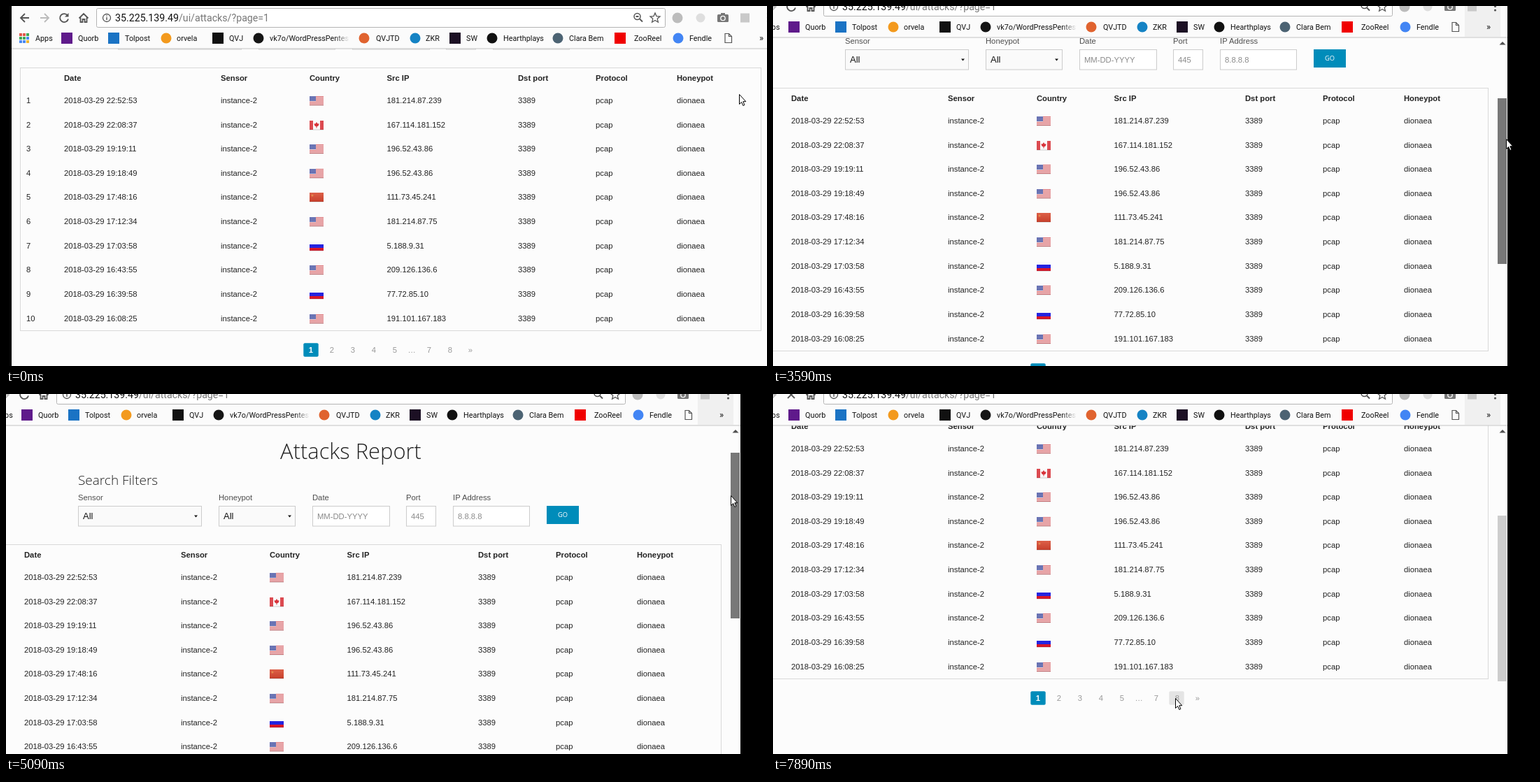
An HTML page for the animation above (8 s loop, 1088 by 515 pixels).

```html
<!DOCTYPE html>
<html lang="en">
<head>
<meta charset="utf-8">
<title>Attacks report</title>
<style>
  html, body { margin: 0; width: 100%; height: 100%; overflow: hidden; background: #000; }
  svg { display: block; }
  text { white-space: pre; }
  .page text { font: 11.25px "Liberation Sans", Arial, sans-serif; fill: #222; }
  .page .bold { font-weight: bold; }
  .page .label { fill: #4d4d4d; }
  .page .hint { fill: #8a8a8a; }
  .page .option { font-size: 13px; fill: #111; }
  .page .light { font-family: "Open Sans", sans-serif; font-weight: 300; }
  .page .go { font: 9.3px "Open Sans", sans-serif; fill: #fff; }
  .page .pager { fill: #999; }
  .page .current { fill: #fff; font-weight: bold; }
  .mid { text-anchor: middle; }
  .chrome text { font: 10.8px Roboto, sans-serif; fill: #111; }
  .chrome .url { font-size: 14.2px; }
  .icon { fill: none; stroke: #555; stroke-width: 1.8; }
</style>
</head>
<body>
<svg id="stage" width="1088" height="515" viewBox="0 0 1088 515"></svg>
<script>
const LOOP = 8000;
const PAPER = '#fcfcfc', BAR = '#fbfbfb', BLUE = '#008cba';

const rect = (x, y, w, h, fill, extra = '') =>
  `<rect x="${x}" y="${y}" width="${w}" height="${h}" fill="${fill}" ${extra}/>`;
const circle = (x, y, r, fill, extra = '') =>
  `<circle cx="${x}" cy="${y}" r="${r}" fill="${fill}" ${extra}/>`;
const path = (d, extra = 'class="icon"') => `<path d="${d}" ${extra}/>`;
const text = (x, y, content, cls = '', extra = '') =>
  `<text x="${x}" y="${y}" class="${cls}" ${extra}>${content}</text>`;
const range = n => [...Array(n).keys()];

// ---- page ----
const flags = {
  us: range(7).map(i => rect(0, i * 2, 20, 1, '#d8646a')).join('') + rect(0, 0, 9, 7, '#6a74b4'),
  ca: rect(0, 0, 5, 13, '#dc4a50') + rect(15, 0, 5, 13, '#dc4a50') +
      path('M10 2l1.4 2.2 2.3.2-1.2 3.200-2 1v2h-1v-2l-2-1-1.200-3.200 2.300-.2z', 'fill="#d8333a"'),
  cn: rect(0, 0, 20, 13, 'url(#silk)') + circle(4, 4, 1.5, '#e58a4a'),
  ru: rect(0, 4, 20, 5, '#2424e0') + rect(0, 9, 20, 4, '#d8182a'),
};
const flag = (code, x, y) =>
  `<g transform="translate(${x} ${y})">${rect(0, 0, 20, 13, code === 'us' ? '#f6e4e4' : '#fafafa')}${flags[code]}` +
  rect(0, 12.5, 20, 1, '#000', 'opacity=".18"') + '</g>';

const attacks = [
  ['22:52:53', 'us', '181.214.87.239'], ['22:08:37', 'ca', '167.114.181.152'],
  ['19:19:11', 'us', '196.52.43.86'], ['19:18:49', 'us', '196.52.43.86'],
  ['17:48:16', 'cn', '111.73.45.241'], ['17:12:34', 'us', '181.214.87.75'],
  ['17:03:58', 'ru', '5.188.9.31'], ['16:43:55', 'us', '209.126.136.6'],
  ['16:39:58', 'ru', '77.72.85.10'], ['16:08:25', 'us', '191.101.167.183'],
];
const columns = { Date: 83, Sensor: 307, Country: 434, 'Src IP': 544.5, 'Dst port': 732, Protocol: 843, Honeypot: 959 };

function attackRow([time, country, ip], i) {
  const y = Math.round(139 + i * 34.62);
  const cells = { Date: '2018-03-29 ' + time, Sensor: 'instance-2', 'Src IP': ip,
                  'Dst port': 3389, Protocol: 'pcap', Honeypot: 'dionaea' };
  return text(29, y, i + 1) + flag(country, columns.Country, y - 10) +
    Object.entries(cells).map(([name, value]) => text(columns[name], y, value)).join('');
}

const field = (x, w, label, value, select) =>
  text(x, 25, label, 'label') +
  rect(x + 0.5, 33.5, w - 1, 28.5, select ? '#fafafa' : '#fff', 'stroke="#ccc"') +
  text(x + 7, select ? 51.5 : 52, value, select ? 'option' : 'hint') +
  (select ? path(`M${x + w - 11} 46.5h5l-2.5 3z`, 'fill="#111"') : '');

const pager = [['2', 466], ['3', 496], ['4', 526], ['5', 556], ['…', 580], ['7', 605], ['8', 635], ['»', 664]];
const pageButton = (x, fill, extra = '') => rect(x + 0.3, 482.3, 21.4, 19.4, fill, 'rx="2" ' + extra);

const page =
  text(550, -34, 'Attacks Report', 'light mid', 'style="font-size:30.9px"') +
  text(160, 3, 'Search Filters', 'light', 'style="font-size:19px"') +
  field(160, 177, 'Sensor', 'All', true) + field(361, 110, 'Honeypot', 'All', true) +
  field(495, 111, 'Date', 'MM-DD-YYYY') + field(629, 43, 'Port', '445') + field(696, 110, 'IP Address', '8.8.8.8') +
  rect(830, 33, 46, 26, BLUE) + text(853, 49, 'GO', 'go mid') +
  rect(20.5, 88.5, 1059, 376, 'none', 'stroke="#d9d9d9"') +
  Object.entries(columns).map(([name, x]) => text(x, 107, name, 'bold')).join('') +
  attacks.map(attackRow).join('') +
  pageButton(425, BLUE) + text(436, 496, '1', 'current mid') +
  pageButton(623, '#e4e4e4', 'id="hover"') +
  pager.map(([label, x]) => text(x, 496, label, 'pager mid')).join('');

// ---- browser frame ----
const bookmarks = [
  ['square', '#5f1a8b', 87, 'Quorb', 103], ['square', '#1a73c4', 154, 'Tolpost', 170],
  ['circle', '#f39a1e', 229, 'orvela', 244], ['square', '#111', 303, 'QVJ', 319],
  ['circle', '#151515', 361, 'vk7o/WordPressPentest', 377], ['circle', '#e0632f', 512, 'QVJTD', 529],
  ['circle', '#1583c4', 585, 'ZKR', 600], ['square', '#1c1024', 642, 'SW', 658],
  ['circle', '#111', 695, 'Hearthplays', 711], ['circle', '#4c6373', 789, 'Clara Bem', 805],
  ['square', '#f00000', 878, 'ZooReel', 898], ['circle', '#4285f4', 961, 'Fendle', 977],
];
const bookmark = ([shape, color, x, label, textX]) =>
  (shape === 'circle' ? circle(x, 46, 7.5, color) : rect(x - 8, 38, 16, 16, color)) + text(textX, 50, label);

const appColors = ['#e2574c', '#3fa757', '#4a8af4', '#f2b632'];
const chrome =
  rect(8, -20, 1099, 81, BAR) + rect(8, 60.5, 1099, 1, '#c4c4c4') +
  rect(1046, 8, 51, 52, '#f0f0f0', 'id="overflow"') +
  path('M33 17H21.500M27 11l-6 6 6 6') +
  path('M49 17h11.500M55 11l6 6-6 6', 'class="icon" style="stroke:#bbb"') +
  `<g id="reload">${path('M88 13.500a6 6 0 1 0 1 5')}${path('M89.500 10v5.500h-5.500z', 'fill="#555"')}</g>` +
  path('M78 12l10 10M88 12l-10 10', 'class="icon" id="stop"') +
  path('M104.500 17.500l6.500-6.500 6.500 6.500M106.500 16.500v6.500h3v-4h3v4h3v-6.500') +
  rect(129.5, 3.5, 813, 27, '#fff', 'rx="2" stroke="#b4b4b4"') +
  circle(144, 17, 5.5, 'none', 'stroke="#555" stroke-width="1.3"') +
  path('M144 16v4M144 13.500v1.300', 'stroke="#555" stroke-width="1.4"') +
  text(156, 21.5, '35.225.139.49<tspan fill="#777">/ui/attacks/?page=1</tspan>', 'url') +
  circle(902.5, 15, 4.5, 'none', 'stroke="#555" stroke-width="1.5"') + path('M906 18.500l4 4M900.500 15h4') +
  path('M928 10l2 4.600 5 .4-3.800 3.300 1.200 4.900-4.400-2.700-4.400 2.700 1.200-4.900L921 15l5-.4z',
       'fill="none" stroke="#555" stroke-width="1.3"') +
  circle(960, 17, 7.5, '#bcbcbc') + circle(993, 17, 6.5, '#dedede') +
  rect(1017, 12, 16, 11, '#777', 'rx="1.5"') + rect(1022, 10, 6, 3, '#777') +
  circle(1025, 17.5, 3.2, '#777', 'stroke="#fff" stroke-width="1.3"') +
  rect(1050, 10.5, 13, 13, '#c9c9c9') +
  [11, 16.5, 22].map(y => circle(1089.5, y, 1.6, '#555')).join('') +
  range(9).map(i => rect(19 + i % 3 * 5, 39 + Math.floor(i / 3) * 5, 4, 4, appColors[Math.floor(i / 3) + (i % 3 > 1)])).join('') +
  text(42, 50, 'Apps') + bookmarks.map(bookmark).join('') +
  rect(470, 38, 28, 16, 'url(#fade)') +
  path('M1028 39.500h5.500l4 4v9h-9.500zM1033.500 39.500v4h4', 'class="icon" style="stroke-width:1.2"') +
  text(1080, 49.5, '»', 'mid', 'style="font-size:13px"');

const stage = document.getElementById('stage');
stage.innerHTML = `
  <defs>
    <clipPath id="view">${rect(8, 61, 1085, 600, '#000')}</clipPath>
    <linearGradient id="fade"><stop stop-color="${BAR}" stop-opacity="0"/><stop offset=".75" stop-color="${BAR}"/></linearGradient>
    <linearGradient id="silk" x2="0" y2="1"><stop stop-color="#dc6048"/><stop offset="1" stop-color="#c8402c"/></linearGradient>
  </defs>
  ${rect(0, 0, 1088, 515, '#000')}
  <g id="window">
    ${rect(8, -20, 1099, 640, PAPER)}
    <g clip-path="url(#view)"><g id="page" class="page">${page}</g></g>
    ${path('M1095.500 71.500h9l-4.500-4.500z', 'fill="#505050"')}
    ${rect(1093, 170, 13, 237, '#cdcdcd', 'id="thumb"')}
    <g class="chrome">${chrome}</g>
  </g>
  <path id="cursor" d="M.5 .5V14.500L3.600 11.500 5.800 16.500 7.900 15.600 5.800 10.700H9.800Z" fill="#fff" stroke="#000"/>`;
const part = Object.fromEntries([...stage.querySelectorAll('[id]')].map(node => [node.id, node]));

// ---- motion ----
const bursts = [[0, 0, 1], [150, 740, 5], [1060, 2070, 8], [2190, 2340, 2], [2640, 2640, 1], [3320, 4250, 8],
                [4400, 5360, 8], [5480, 6330, 7], [6740, 7740, 8], [7890, 7890, 1]];
const windowKeys = [[1000, 0, 0], [1340, -57, -16]];
const scrollKeys = [[3190, 0], [3586, 45], [4250, 93], [4537, 110], [5086, 143], [5223, 140],
                    [5360, 120], [5480, 96], [5763, 36], [6047, -12], [6330, -41]];
const cursorKeys = [[50, 1048, 126], [297, 1032, 82], [592, 985, 4], [740, 978, -24], [1500, 1005, -24],
                    [1640, 1012, 20], [2070, 1048, 203], [2340, 1048, 211], [3190, 1048, 211], [3586, 1048, 190],
                    [4400, 1041, 161], [4537, 1040, 156], [5086, 1036, 145], [5360, 1040, 156], [5763, 1049, 196],
                    [6330, 1048, 233], [6600, 1048, 233], [7100, 860, 330], [7600, 600, 428], [7740, 575, 435]];

function snap(time) {
  const [start, end, steps] = bursts.findLast(burst => burst[0] <= time);
  const interval = (end - start) / Math.max(1, steps - 1) || 1;
  return start + Math.min(steps - 1, Math.floor((time - start + 25) / interval)) * interval;
}

function sample(keys, time) {
  const next = keys.findIndex(key => key[0] > time);
  if (next === 0) return keys[0].slice(1);
  if (next < 0) return keys.at(-1).slice(1);
  const from = keys[next - 1], to = keys[next];
  const mix = (time - from[0]) / (to[0] - from[0]);
  return from.slice(1).map((value, i) => value + (to[i + 1] - value) * mix);
}

const move = (node, x, y) => node.setAttribute('transform', `translate(${Math.round(x)} ${Math.round(y)})`);
const show = (node, visible) => node.setAttribute('visibility', visible ? 'visible' : 'hidden');

function draw(now) {
  const time = snap(now % LOOP);
  const [scroll] = sample(scrollKeys, time);
  const [cursorX, cursorY] = sample(cursorKeys, time);
  move(part.window, ...sample(windowKeys, time));
  move(part.page, 0, scroll);
  move(part.thumb, 0, -scroll * 0.49);
  move(part.cursor, cursorX, cursorY);
  part.thumb.setAttribute('fill', time >= 2640 && time < 6740 ? '#787878' : '#cdcdcd');
  show(part.overflow, time > 1600);
  show(part.hover, cursorY > 420 && cursorX < 588);
  show(part.reload, time < 7890);
  show(part.stop, time >= 7890);
  requestAnimationFrame(draw);
}
requestAnimationFrame(draw);
</script>
</body>
</html>
```
